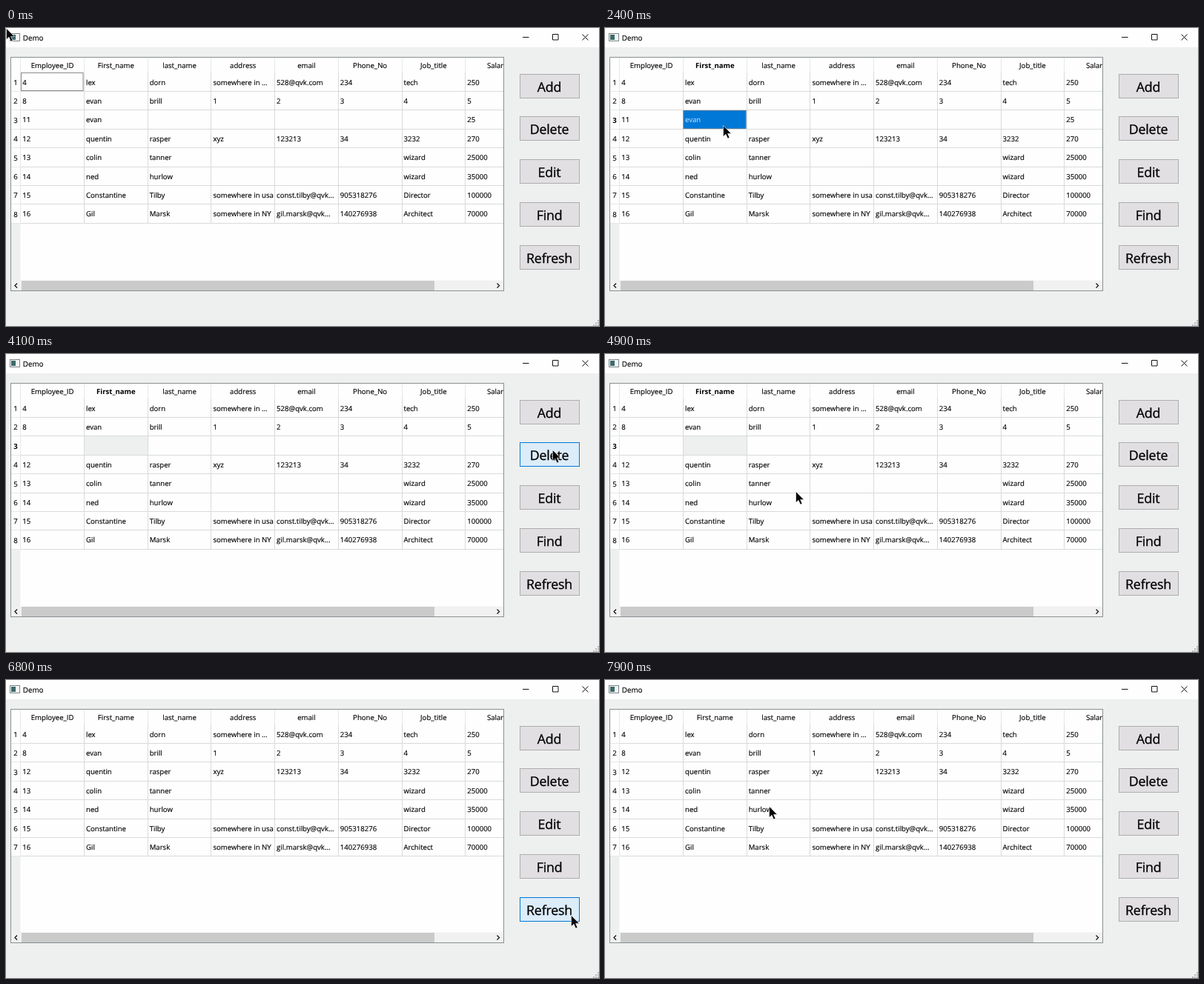
An HTML page for the animation above (8000 ms loop, 800x402 px).

```html
<!DOCTYPE html>
<html lang="en">
<head>
<meta charset="utf-8">
<title>Demo</title>
<style>
  html, body { margin: 0; width: 100%; height: 100%; overflow: hidden; background: #edf0ee; }
  svg { display: block; width: 800px; height: 402px; }
  text {
    font: 9.6px "Open Sans", "Noto Sans", sans-serif; white-space: pre; text-rendering: geometricPrecision;
    fill: #000; stroke: #000; stroke-width: .15px;
  }
  .mid { text-anchor: middle; }
  .bold { font-weight: 700; stroke: none; }
  .chosen { fill: #d5e8f8; stroke: none; }
  .title { font-size: 9.9px; }
  .label { font-size: 17.8px; letter-spacing: -.2px; text-anchor: middle; stroke-width: .3px; }
  .button { fill: #e1dfe2; stroke: #adadad; }
  .hover { fill: #dcecf9; stroke: #0078d7; }
  .pressed { fill: #cce4f7; stroke: #005499; }
  .grid { stroke: #d9dadb; fill: none; }
  .soft { stroke: #e6e8e8; fill: none; }
  .ink { stroke: #111; fill: none; }
</style>
</head>
<body>
<svg viewBox="0 0 800 402">
  <defs><clipPath id="view"><rect x="7" y="40" width="664" height="314"/></clipPath></defs>
  <rect width="800" height="402" fill="#edf0ee"/>
  <rect width="800" height="26" fill="#fefefe"/>

  <rect x="5.5" y="7.5" width="13" height="10" fill="#f4f8f8" stroke="#7d8688"/>
  <rect x="7" y="9" width="6" height="7" fill="#3f6a6c"/>
  <text class="title" x="22.7" y="16.5">Demo</text>
  <path class="ink" d="M697 12.5h8.500M737.500 8.500h7.500v7.500h-7.500zM777.500 8.500l8 8m0-8l-8 8"/>

  <rect x="6.500" y="39.500" width="665" height="315" fill="#fefefe" stroke="#8a8f94"/>
  <g clip-path="url(#view)" id="table"></g>
  <rect x="7" y="340.500" width="664" height="13.500" fill="#f0f1f0"/>
  <rect x="21" y="341" width="557" height="13" fill="#cacacb"/>
  <path class="ink" stroke-width="1.3" d="M15 344.500l-3 3 3 3M662.500 344.500l3 3-3 3"/>

  <g id="buttons"></g>
  <path fill="#b4b8b6" d="M798 394h2v2h-2zM795 397h2v2h-2zM798 397h2v2h-2zM792 400h2v2h-2zM795 400h2v2h-2zM798 400h2v2h-2z"/>
  <path id="cursor" fill="#050505" stroke="#fff" stroke-width=".6"
        d="M0 0V15L3.500 11.800 6 17.500 8.500 16.400 6.100 10.900H10.800Z"/>
</svg>
<script>
const LOOP = 8000, STEP = 100;
const PICK = 2100, CLEAR = 3900, REFRESH = 6500;
const LEFT = 19.8, COL = 85.7, TOP = 60, ROW = 25.4;

const heads = ["Employee_ID", "First_name", "last_name", "address", "email", "Phone_No", "Job_title", "Salary"];
const staff = [
  "4|lex|dorn|somewhere in ...|528@qvk.com|234|tech|250",
  "8|evan|brill|1|2|3|4|5",
  "11|evan||||||25",
  "12|quentin|rasper|xyz|123213|34|3232|270",
  "13|colin|tanner||||wizard|25000",
  "14|ned|hurlow||||wizard|35000",
  "15|Constantine|Tilby|somewhere in usa|const.tilby@qvk...|905318276|Director|100000",
  "16|Gil|Marsk|somewhere in NY|gil.marsk@qvk...|140276938|Architect|70000"
].map(line => line.split("|"));
const buttons = [["Add", 62], ["Delete", 119.5], ["Edit", 177], ["Find", 235], ["Refresh", 293.5]];

// Pointer stops: time, x, y
const path = [
  [0, 0, 0], [200, 14, 12], [900, 205, 122], [1300, 216, 129], [1900, 158, 127],
  [2400, 159, 131], [2700, 165, 132], [3200, 728, 128], [3400, 735, 127],
  [4200, 737, 129], [4800, 262, 182], [4900, 257, 185], [5500, 232, 136],
  [6200, 755, 312], [6500, 762, 317], [7200, 762, 317], [7400, 700, 330],
  [7800, 232, 176], [7900, 221, 170]
];

const $ = id => document.getElementById(id);
const text = (s, x, y, cls = "") => `<text x="${x}" y="${y}" class="${cls}">${s}</text>`;
const rect = (x, y, w, h, attrs) => `<rect x="${x}" y="${y}" width="${w}" height="${h}" ${attrs}/>`;
const colX = c => LEFT + c * COL;
const rowY = r => TOP + r * ROW;
const line = v => Math.floor(v) + 0.5;

function tableMarkup(phase) {
  const rows = phase === 3 ? staff.filter((_, i) => i !== 2) : staff;
  const marked = phase === 1 || phase === 2;
  const end = line(rowY(rows.length));
  let out = rect(7, end, 12.5, 341 - end, 'fill="#edf0ee"');

  heads.forEach((head, c) => {
    const x = line(colX(c + 1));
    out += `<path class="soft" d="M${x} 40V60"/><path class="grid" d="M${x} 60V${end}"/>`;
    out += text(head, colX(c) + COL / 2, 54, "mid" + (marked && c === 1 ? " bold" : ""));
  });
  out += `<path class="soft" d="M19.5 40V${end}"/>`;

  rows.forEach((cells, r) => {
    const y = line(rowY(r + 1)), base = rowY(r) + 16.6;
    out += `<path class="soft" d="M7 ${y}H19"/><path class="grid" d="M20 ${y}H671"/>`;
    out += text(r + 1, 13, base + .4, "mid" + (marked && r === 2 ? " bold" : ""));
    const spot = marked && r === 2;
    if (spot && phase === 1) {
      out += rect(105.5, 111, 85, 25, 'fill="#0078d7"');
      out += rect(106, 111.5, 84, 24, 'fill="none" stroke="#8b8078" stroke-dasharray="1 1"');
    }
    if (spot && phase === 2) {
      out += rect(106, 111, 85, 25, 'fill="#edf0ee"');
      return;
    }
    cells.forEach((s, c) => {
      if (s) out += text(s, colX(c) + 2.5, base, spot && c === 1 ? "chosen" : "");
    });
  });
  if (phase === 0) out += rect(20.5, 60.5, 83.5, 24, 'fill="none" stroke="#8c8c8c"');
  return out;
}

function buttonMarkup(hot, down) {
  return buttons.map(([name, y], i) => {
    const cls = i !== hot ? "" : down ? " pressed" : " hover";
    return rect(693.5, line(y), 80, 32, `class="button${cls}"`) + text(name, 733, y + 23.6, "label");
  }).join("");
}

function pointer(t) {
  let i = 0;
  while (i < path.length - 2 && path[i + 1][0] <= t) i++;
  const [t0, x0, y0] = path[i], [t1, x1, y1] = path[i + 1];
  const k = Math.min(1, (t - t0) / (t1 - t0));
  const e = k * k * (3 - 2 * k);
  return [x0 + (x1 - x0) * e, y0 + (y1 - y0) * e];
}

const shown = {};
function update(id, key, markup) {
  if (shown[id] === key) return;
  shown[id] = key;
  $(id).innerHTML = markup();
}

function draw(now) {
  const t = Math.floor(now % LOOP / STEP) * STEP;
  const [x, y] = pointer(t);
  const phase = t < PICK ? 0 : t < CLEAR ? 1 : t < REFRESH ? 2 : 3;
  const hot = buttons.findIndex(b => x >= 693 && x <= 774 && y >= b[1] && y <= b[1] + 33);
  const down = [CLEAR, REFRESH].some(click => t >= click - 100 && t <= click);
  update("table", phase, () => tableMarkup(phase));
  update("buttons", hot + "/" + down, () => buttonMarkup(hot, down));
  $("cursor").setAttribute("transform", `translate(${(x + .5).toFixed(1)} ${(y + .5).toFixed(1)})`);
}

const start = performance.now();
function tick() {
  draw(performance.now() - start);
  requestAnimationFrame(tick);
}
tick();
</script>
</body>
</html>
```
